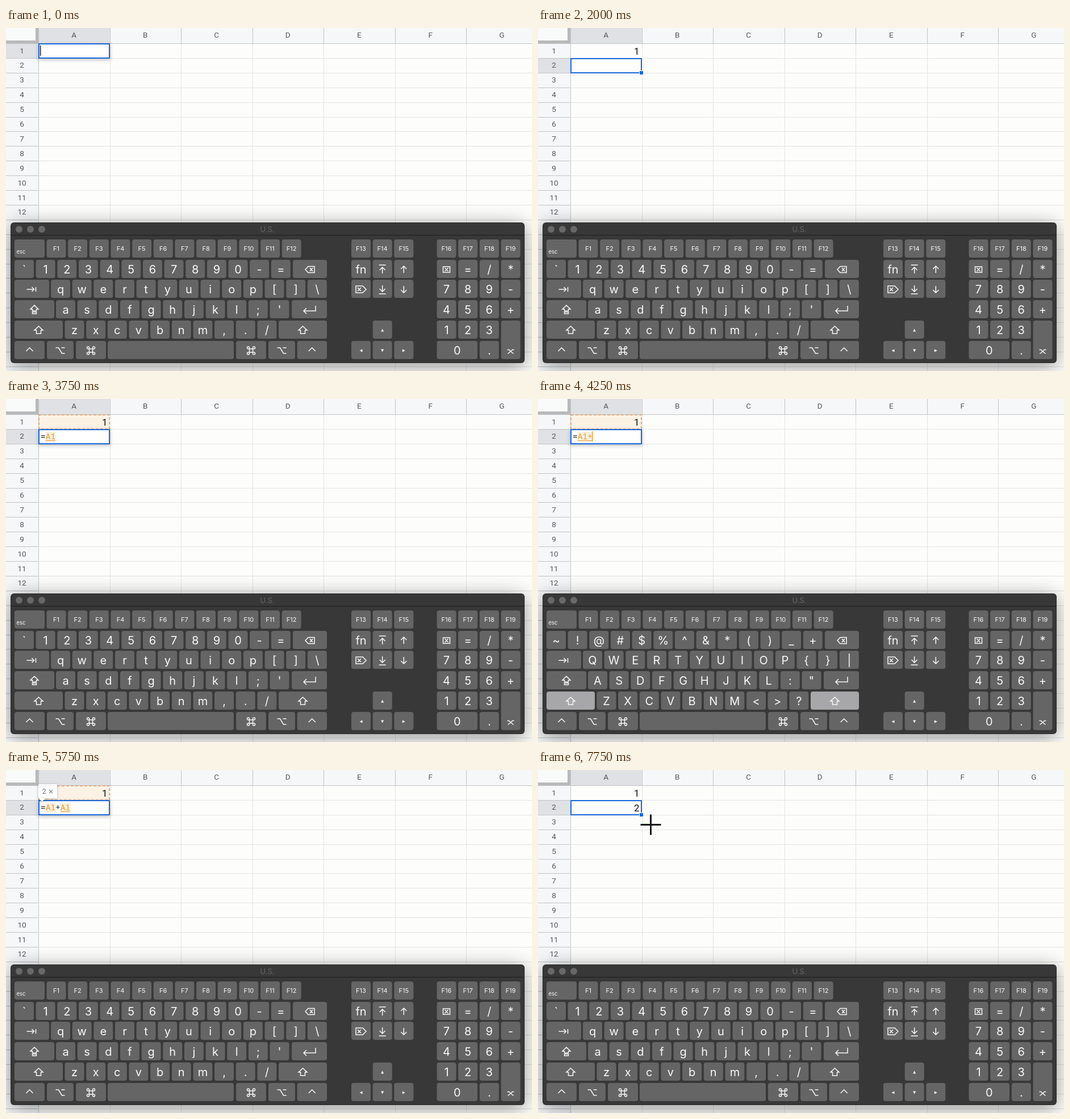
Write an HTML page with a canvas that moves like this. It is 926 px wide and 605 px high and loops after 8000 ms.

```html
<!DOCTYPE html>
<html lang="en">
<head>
<meta charset="utf-8">
<style>
  html, body { margin: 0; width: 100%; height: 100%; overflow: hidden; background: #fcfcfc; }
  canvas { display: block; }
</style>
</head>
<body>
<canvas id="stage" width="926" height="605"></canvas>
<script>
const ctx = document.getElementById('stage').getContext('2d');
const W = 926, H = 605, STEP = 250, STEPS = 32;
const LEFT = 57, TOP = 27, COL = 125.5, ROW = 25.9;
const BLUE = '#1a68dc', ORANGE = '#e8992c';
const HEADER = '#f5f7f9', HEADER_ACTIVE = '#dfe1e4', GRID = '#e3e3e3', EDGE = '#c2c3c4', LABEL = '#55575a';
const SANS = 'Inter, sans-serif', SHEET = 'Roboto, sans-serif';
const CELL = '17px ' + SHEET;
const MONO = '14.5px "Noto Sans Mono", monospace';
const CHAR = 8.7;

const colX = i => Math.round(LEFT + i * COL);
const rowY = i => Math.round(TOP + i * ROW);

function rect(x, y, w, h, fill) {
  ctx.fillStyle = fill;
  ctx.fillRect(x, y, w, h);
}

function rounded(x, y, w, h, r, fill) {
  ctx.beginPath();
  ctx.roundRect(x, y, w, h, r);
  ctx.fillStyle = fill;
  ctx.fill();
}

function text(str, x, y, font, color, align = 'center') {
  ctx.font = font;
  ctx.fillStyle = color;
  ctx.textAlign = align;
  ctx.fillText(str, x, y);
}

function withShadow(color, blur, dy, draw) {
  ctx.save();
  ctx.shadowColor = color;
  ctx.shadowBlur = blur;
  ctx.shadowOffsetY = dy;
  draw();
  ctx.restore();
}

// Each scene: first step, cell contents, active row, and the keys struck on entry.
const scenes = [
  { from: 0, edit: '' },
  { from: 4, edit: '1', keys: ['1'] },
  { from: 7, a1: 1, row: 1, keys: ['return'] },
  { from: 11, a1: 1, row: 1, edit: '=', keys: ['='] },
  { from: 13, a1: 1, row: 1, edit: '=A1', keys: ['up'] },
  { from: 16, a1: 1, row: 1, edit: '=A1', shift: true, keys: ['='], blink: 2 },
  { from: 17, a1: 1, row: 1, edit: '=A1+', shift: true, merged: true },
  { from: 18, a1: 1, row: 1, edit: '=A1+' },
  { from: 20, a1: 1, row: 1, edit: '=A1+A1', keys: ['up'] },
  { from: 21, a1: 1, row: 1, edit: '=A1+A1', tip: true, blink: 1 },
  { from: 25, a1: 1, a2: 2, row: 2, keys: ['return'] },
  { from: 26, a1: 1, a2: 2, row: 1 }
];

function drawSheet(s) {
  const active = s.row || 0;
  rect(0, 0, W, H, '#fdfdfc');
  rect(0, 0, W, TOP, HEADER);
  rect(0, TOP, LEFT, H, HEADER);
  rect(LEFT, 0, COL, TOP, HEADER_ACTIVE);
  rect(0, rowY(active), LEFT, ROW, HEADER_ACTIVE);

  for (let i = 0; i < 7; i++) {
    const x = colX(i);
    rect(x, 0, 1, TOP, EDGE);
    rect(x, TOP, 1, H, i ? GRID : EDGE);
    text(String.fromCharCode(65 + i), LEFT + (i + .5) * COL, 17, '13.5px ' + SHEET, LABEL);
  }
  for (let i = 0; i < 24; i++) {
    const y = rowY(i);
    rect(0, y, LEFT, 1, EDGE);
    rect(LEFT, y, W, 1, i ? GRID : EDGE);
    text(i + 1, 28, TOP + i * ROW + 17.5, '13.5px ' + SHEET, LABEL);
  }
  rect(0, 0, 52, 22, '#f9fafa');
  rect(0, 22, LEFT, 5, '#b9b9b9');
  rect(52, 0, 5, TOP, '#b9b9b9');
}

function drawFormula(str, y, merged) {
  text('=', 61, y, MONO, '#222', 'left');
  const parts = merged ? ['A1+'] : str.slice(1).match(/A1|\+/g) || [];
  let x = 61 + CHAR;
  parts.forEach((part, i) => {
    const ref = part[0] === 'A', w = part.length * CHAR;
    if (ref) {
      rect(x, y - 13, w, 17, '#f8efdc');
      if (i === parts.length - 1) rect(x, y + 2, w, 1, ORANGE);
    }
    text(part, x, y, MONO, ref ? ORANGE : '#222', 'left');
    x += w;
  });
  return x;
}

function drawCells(s, age) {
  const row = s.row || 0, y = rowY(row), editing = s.edit !== undefined;
  if (editing && s.edit.includes('A1')) {
    rect(58, 28, 124, 25, '#fcf2e4');
    ctx.setLineDash([5, 3]);
    ctx.strokeStyle = '#e59a66';
    ctx.lineWidth = 1.6;
    ctx.strokeRect(58, 28, 124, 25);
    ctx.setLineDash([]);
  }
  if (s.a1) text(s.a1, 178.5, 47, CELL, '#111', 'right');
  if (s.a2) text(s.a2, 178.5, 73, CELL, '#111', 'right');

  if (editing) {
    withShadow('rgba(60,64,67,.35)', 6, 2, () => rect(57, y, 126, 27, '#fff'));
  }
  ctx.strokeStyle = BLUE;
  ctx.lineWidth = 2;
  ctx.strokeRect(58, y + 1, 124, 25);
  if (!editing) {
    rect(178, y + 22, 8, 8, '#fff');
    rect(179, y + 23, 6, 6, BLUE);
    return;
  }

  let end = 61;
  if (s.edit[0] === '=') {
    end = drawFormula(s.edit, y + 18, s.merged);
    if (s.edit === '=') {
      ctx.strokeStyle = '#aaa';
      ctx.lineWidth = 1;
      ctx.stroke(new Path2D(`M72.5 ${y + 16}v3.5h8v-3.5`));
    }
  } else if (s.edit) {
    text(s.edit, 61, y + 18, CELL, '#111', 'left');
    end = 70;
  }
  if ((age + (s.blink || 0)) % 4 < 2) rect(Math.round(end - .6), y + 4, 1.4, 18, s.merged ? ORANGE : '#111');

  if (s.tip) {
    withShadow('rgba(0,0,0,.3)', 4, 1, () => {
      rounded(57, 25, 33, 25, 2, '#fff');
      ctx.fill(new Path2D('M57 49H70L63.5 56Z'));
    });
    text('2', 67, 42, '12px ' + SHEET, '#5f686e');
    ctx.strokeStyle = '#84888c';
    ctx.lineWidth = 1.3;
    ctx.stroke(new Path2D('M76 35l6 6m0-6l-6 6'));
  }
}

const icons = {
  ctrl: 'M-6 1L0-5L6 1',
  opt: 'M-8-5H-3L3 5H8M2-5H8',
  cmd: 'M-3-3H3V3H-3ZM-3-3H-5A2 2 0 1 1-3-5ZM3-3V-5A2 2 0 1 1 5-3ZM3 3H5A2 2 0 1 1 3 5ZM-3 3V5A2 2 0 1 1-5 3Z',
  shift: 'M0-7L7.5 0H4V6H-4V0H-7.5Z',
  caps: 'M0-8L7-1H3.5V2H-3.5V-1H-7ZM-3.5 4H3.5V7H-3.5Z',
  tab: 'M-9 0H4M0-4L4 0L0 4M7-4V4',
  return: 'M11-7V2H-10M-5-3L-10 2L-5 7',
  back: 'M-3-5.5H8V5.5H-3L-8 0ZM0-3L5 3M5-3L0 3',
  del: 'M3-6H-9V6H3L9 0ZM0-3L-6 3M-6-3L0 3',
  clear: 'M-6-5H6V5H-6ZM-3-3L3 3M3-3L-3 3',
  home: 'M-6-8H6M0 7V-4M-5 1L0-4L5 1',
  end: 'M-6 8H6M0-7V4M-5-1L0 4L5-1',
  pgup: 'M0 6V-6M-5-1L0-6L5-1',
  pgdn: 'M0-6V6M-5 1L0 6L5 1',
  enter: 'M-6-3.5H-3L0-.5L3-3.5H6M-5 3.5L0-.5L5 3.5'
};
const arrows = {
  up: 'M0-2.5L2.5 2.5H-2.5Z',
  down: 'M0 2.5L2.5-2.5H-2.5Z',
  left: 'M-2.5 0L2.5-2.5V2.5Z',
  right: 'M2.5 0L-2.5-2.5V2.5Z'
};

const PITCH = 37.65, KEY = 34, KEY_H = 32;
const rowTops = [373, 409, 444, 480, 516, 552];
const keys = [];
const addKey = (id, row, x, w = KEY, upper = id, h = KEY_H) =>
  keys.push({ id, x, y: rowTops[row], w, h, upper });
const addRun = (row, x, ids, uppers = ids) =>
  [...ids].forEach((id, i) => addKey(id, row, x + i * PITCH, KEY, uppers[i]));
const numbered = (first, count) => Array.from({ length: count }, (_, i) => 'F' + (first + i));

addKey('esc', 0, 15, 53);
addRun(0, 71.5, numbered(1, 12));
addRun(1, 15, '`1234567890-=', '~!@#$%^&*()_+');
addKey('back', 1, 505, 60);
addKey('tab', 2, 15, 61);
addRun(2, 79, 'qwertyuiop[]\\', 'QWERTYUIOP{}|');
addKey('caps', 3, 15, 70);
addRun(3, 88, "asdfghjkl;'", 'ASDFGHJKL:"');
addKey('return', 3, 503, 62);
addKey('shift', 4, 15, 85);
addRun(4, 103.5, 'zxcvbnm,./', 'ZXCVBNM<>?');
addKey('shift', 4, 480, 85);
[['ctrl', 15, 53], ['opt', 72, 47], ['cmd', 123, 53], ['', 179, 222],
 ['cmd', 405, 53], ['opt', 462, 47], ['ctrl', 512.5, 52.5]]
  .forEach(([id, x, w]) => addKey(id, 5, x, w));
addRun(0, 608, numbered(13, 3));
addRun(1, 608, ['fn', 'home', 'pgup']);
addRun(2, 608, ['del', 'end', 'pgdn']);
addKey('up', 4, 645.7);
addRun(5, 608, ['left', 'down', 'right']);
addRun(0, 758.5, numbered(16, 4));
['clear', '789-', '456+', '123'].forEach((ids, i) =>
  addRun(i + 1, 758.5, i ? ids : ['clear', '=', '/', '*']));
addKey('enter', 4, 871.5, KEY, '', 68);
addKey('0', 5, 758.5, 71.5);
addKey('.', 5, 833.8);

function drawKey(k, s, struck) {
  const pad = k.x > 750;
  const pressed = k.id === 'shift' ? s.shift : !pad && struck.includes(k.id);
  rounded(k.x, k.y, k.w, k.h, 4, pressed ? '#a7a7a9' : '#656565');
  const x = k.x + k.w / 2, y = k.y + k.h / 2, white = '#f8f8f8';
  const icon = icons[k.id], arrow = arrows[k.id];
  if (icon || arrow) {
    ctx.save();
    ctx.translate(x, y + (k.id === 'enter' ? 21 : 1));
    ctx.strokeStyle = ctx.fillStyle = white;
    ctx.lineWidth = 1.5;
    if (icon) ctx.stroke(new Path2D(icon));
    else ctx.fill(new Path2D(arrow));
    ctx.restore();
  } else if (k.id === 'esc') {
    text('esc', 18.5, 398, '9.5px ' + SANS, white, 'left');
  } else if (/^F\d/.test(k.id)) {
    text(k.id, x, y + 3.5, '11px ' + SANS, white);
  } else {
    text(s.shift ? k.upper : k.id, x, y + 8, '20px ' + SANS, white);
  }
}

function drawKeyboard(s, struck) {
  withShadow('rgba(0,0,0,.42)', 36, 6, () => rounded(8, 343, 905, 248, 6, '#2a2a2a'));
  rounded(9, 344, 903, 246, 5, '#383838');
  rect(9, 365, 903, 1, '#1c1c1c');
  for (let i = 0; i < 3; i++) {
    ctx.beginPath();
    ctx.arc(23 + i * 20, 355, 6, 0, Math.PI * 2);
    ctx.fillStyle = '#686868';
    ctx.fill();
  }
  text('U.S.', 460, 360, '13px ' + SANS, '#666');
  keys.forEach(k => drawKey(k, s, struck));
}

function drawCrosshair(x, y) {
  rect(x - 18, y - 1.5, 36, 3, '#16161a');
  rect(x - 1.5, y - 18, 3, 36, '#16161a');
}

function draw(step) {
  const s = scenes.findLast(scene => scene.from <= step);
  const age = step - s.from;
  drawSheet(s);
  drawCells(s, age);
  drawKeyboard(s, age === 0 && s.keys || []);
  if (step >= 30) drawCrosshair(198.5, 96.5);
}

let shown = -1;
const start = performance.now();
function tick(now) {
  const step = Math.floor(Math.max(0, now - start) / STEP) % STEPS;
  if (step !== shown) draw(shown = step);
  requestAnimationFrame(tick);
}
tick(start);
</script>
</body>
</html>
```
